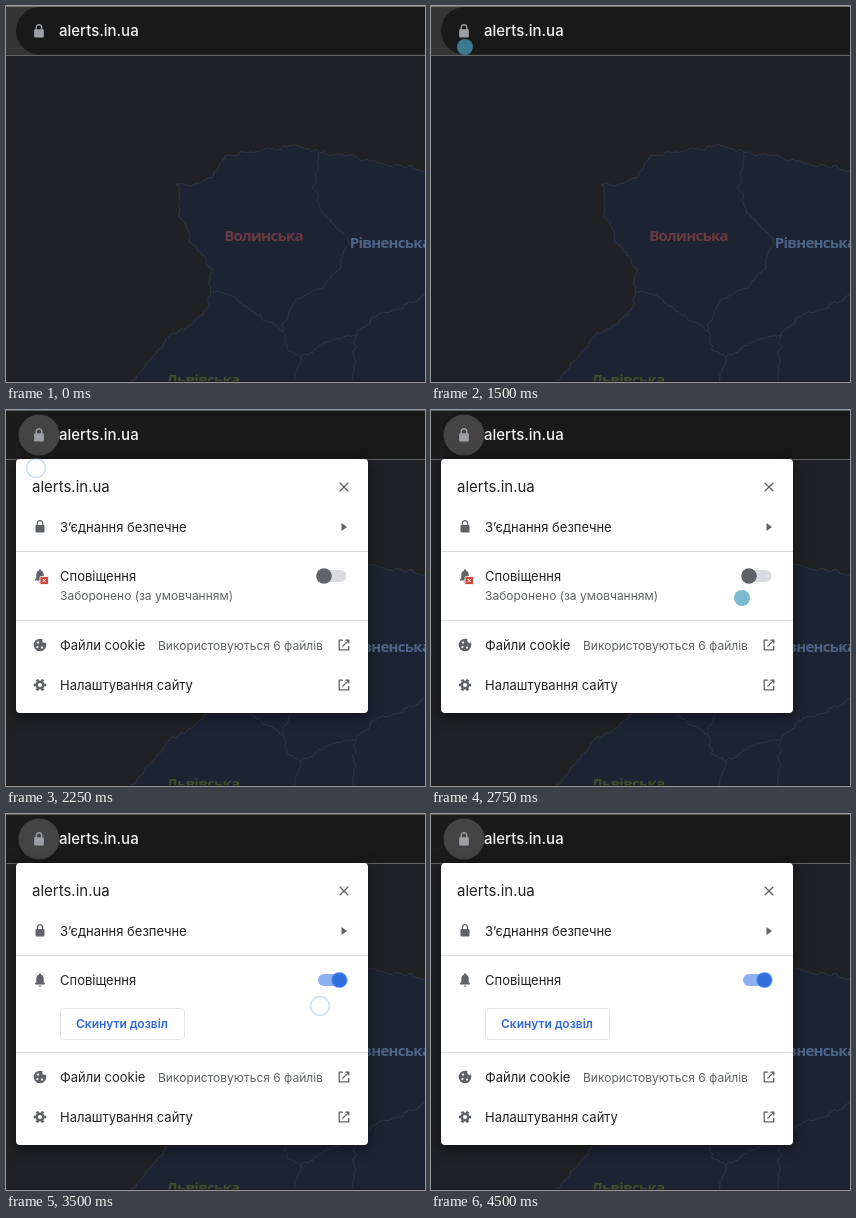
Write an HTML page that moves like this. It is 419 by 376 pixels and loops after 5250 ms.

```html
<!DOCTYPE html>
<html lang="uk">
<head>
<meta charset="utf-8">
<title>Дозвіл на сповіщення</title>
<style>
  html, body { margin: 0; width: 100%; height: 100%; overflow: hidden; background: #202124; }
  svg { display: block; width: 419px; height: 376px; }
  text { font: 400 13px Inter, Roboto, sans-serif; fill: #202124; }
  .host { font-size: 15px; }
  .sub { font-size: 12px; fill: #5f6368; }
  .btn { font-size: 12px; font-weight: 600; fill: #3069d8; }
  .region {
    font: 700 15px "Open Sans", "Noto Sans", sans-serif;
    letter-spacing: -.7px;
    text-anchor: middle;
  }
  .icon { fill: #5f6368; }
  .line { fill: none; stroke: #5f6368; stroke-width: 1.3; }
  .rule { fill: #dadce0; }
  #land { fill: #1c2433; }
  #borders { fill: none; stroke: #2d3746; stroke-width: 1; }
  #panel { filter: drop-shadow(0 3px 7px rgba(0, 0, 0, .5)); }
  #dot { fill: rgba(72, 158, 190, .72); }
  #ring { fill: none; stroke: rgba(88, 175, 205, .32); stroke-width: 1.7; }
</style>
</head>
<body>
<svg viewBox="0 0 419 376">
  <defs>
    <g id="lock">
      <rect x="-4.5" y="-2" width="9" height="7.6" rx="1"/>
      <path d="M-2.6-1.5v-2.2a2.6 2.6 0 0 1 5.2 0v2.2" fill="none" stroke-width="1.3"/>
    </g>
    <path id="open" class="line" d="M-1-4.8H-4.8V4.8H4.8V1M1.4-4.8H4.8V-1.4M4.8-4.8L-1.6 1.6"/>
  </defs>

  <rect width="419" height="376" fill="#202124"/>
  <path id="land"/>
  <path id="borders"/>
  <text class="region" x="257.5" y="235" style="fill:#6c3a43">Волинська</text>
  <text class="region" x="384" y="242" style="fill:#4c6489">Рівненська</text>
  <text class="region" x="197" y="379" style="fill:#424d2b">Львівська</text>
  <rect y="375" width="419" height="1" fill="#17110f" opacity=".5"/>

  <rect id="bar" width="419" height="49" fill="#353536"/>
  <rect id="pill" x="10" y="1" width="450" height="47.5" rx="23.7" fill="#191919"/>
  <rect id="edge" width="419" height="1" fill="#747577"/>
  <rect y="49" width="419" height="1" fill="#626366"/>
  <circle id="halo" cx="33" cy="25" r="20.5" fill="#444445"/>
  <use href="#lock" transform="translate(33 25.5) scale(1.08)" fill="#9c9fa3" stroke="#9c9fa3"
       stroke-width="0"/>
  <text class="host" x="53" y="30" style="fill:#f1f2f4;font-weight:500">alerts.in.ua</text>

  <g id="popup">
    <rect id="panel" x="10" y="49" width="352" height="254" rx="4" fill="#fff"/>
    <text class="host" x="26" y="82">alerts.in.ua</text>
    <path class="line" d="M333.7 72.7l8.6 8.6m0-8.6l-8.6 8.6"/>

    <use href="#lock" x="34" y="117" class="icon" stroke="#5f6368" stroke-width="0"/>
    <text x="54" y="122">З’єднання безпечне</text>
    <path class="icon" d="M335.5 113l5.5 4-5.5 4z"/>
    <rect class="rule" x="10" y="141" width="352" height="1"/>

    <path class="icon" d="M29 170.5v-1l1.3-1.4v-3.4q0-3.2 2.7-3.9v-.5a1 1 0 0 1 2 0v.5q2.7.7 2.7 3.9v3.4l1.3 1.4v1zM32.7 171.4h2.6a1.3 1.3 0 0 1-2.6 0z"/>
    <text x="54" y="171">Сповіщення</text>

    <g id="denied">
      <rect x="34" y="166.5" width="8.5" height="8" rx="1" fill="#d0443a" stroke="#fff" stroke-width=".8"/>
      <path d="M36.6 168.9l3.2 3.2m0-3.2l-3.2 3.2" stroke="#fff"/>
      <text class="sub" x="54" y="190">Заборонено (за умовчанням)</text>
    </g>
    <rect id="track" x="312" y="160" width="28.5" height="12" rx="6"/>
    <circle id="knob" cx="318" cy="166" r="7.8"/>

    <g id="reset">
      <rect x="54.5" y="194.5" width="124" height="31" rx="3.5" fill="#fff" stroke="#e3e5e8"/>
      <text class="btn" x="70" y="214">Скинути дозвіл</text>
    </g>

    <g id="lower">
      <rect class="rule" x="10" y="210" width="352" height="1"/>
      <circle class="icon" cx="34" cy="235" r="6.3"/>
      <g fill="#fff">
        <circle cx="38.6" cy="230.6" r="2.3"/>
        <circle cx="32" cy="232.6" r="1.1"/>
        <circle cx="31.4" cy="237" r="1.1"/>
        <circle cx="36" cy="237.6" r="1.1"/>
      </g>
      <text x="54" y="240">Файли cookie</text>
      <text class="sub" x="152" y="239.5">Використовуються 6 файлів</text>
      <use href="#open" x="338" y="235"/>

      <g fill="none" stroke="#5f6368" stroke-width="2.5">
        <circle cx="34" cy="275" r="3.3"/>
        <circle cx="34" cy="275" r="5" pathLength="12" stroke-dasharray="1" stroke-dashoffset=".5"/>
      </g>
      <text x="54" y="280">Налаштування сайту</text>
      <use href="#open" x="338" y="275"/>
    </g>
  </g>

  <circle id="dot" r="8"/>
  <circle id="ring" r="9.4"/>
</svg>
<script>
const LOOP = 5250, TICK = 250;
const PRESS = 2000, OPEN = 2250, ALLOW = 3500;
const $ = id => document.getElementById(id);

// Ragged borders: a few key points joined by seeded midpoint displacement
let seed = 11;
const rand = () => (seed = seed * 16807 % 2147483647) / 2147483647 - .5;

function rough(a, b) {
  const len = Math.hypot(b[0] - a[0], b[1] - a[1]);
  if (len < 3) return [b];
  const sway = Math.min(len * .5, 4);
  const mid = [0, 1].map(i => (a[i] + b[i]) / 2 + rand() * sway);
  return [...rough(a, mid), ...rough(mid, b)];
}

function border(spec) {
  const pts = spec.split(' ').map(p => p.split(',').map(Number));
  return pts.slice(1).reduce((out, p, i) => out.concat(rough(pts[i], p)), [pts[0]]);
}

const path = pts => 'M' + pts.map(p => p.map(v => v.toFixed(1)).join(' ')).join('L');

const lines = [
  '204,286 207,264 186,238 173,206 170,178 184,180 205,172 219,149 251,145 283,139 313,146 345,149 372,157 420,164',
  '204,286 197,309 165,328 124,377',
  '313,146 306,182 315,204 342,235 335,262 316,283 290,293 277,325',
  '204,286 228,291 250,308 277,325',
  '277,325 281,344 295,352 290,377',
  '295,352 327,333 350,330 347,377',
  '350,330 372,308 396,303 420,288'
].map(border);
const [coast, west] = lines;

$('land').setAttribute('d', path([...west.slice().reverse(), ...coast, [420, 377]]) + 'Z');
$('borders').setAttribute('d', lines.map(path).join(''));

// Each step [time, style] holds until the next one
const runs = [];
function hold(id, steps) {
  const frames = steps.map(([t, style]) => ({ ...style, offset: t / LOOP, easing: 'steps(1, end)' }));
  frames.push({ ...steps[steps.length - 1][1], offset: 1 });
  runs.push($(id).animate(frames, { duration: LOOP, iterations: Infinity }));
}

const swap = (id, time, before, after) => hold(id, [[0, before], [time, after]]);
const fill = color => ({ fill: color });
const move = (x, y) => ({ transform: `translate(${x}px, ${y}px)` });
const off = { opacity: 0 }, on = { opacity: 1 };

hold('bar', [[0, fill('#353536')], [PRESS, fill('#2c2c2d')], [OPEN, fill('#1c1c1c')]]);
swap('edge', PRESS, fill('#747577'), fill('#5c5d5f'));
swap('halo', PRESS, off, on);
swap('popup', OPEN, off, on);
swap('panel', ALLOW, { height: '254px' }, { height: '282px' });
swap('denied', ALLOW, on, off);
swap('reset', ALLOW, off, on);
swap('lower', ALLOW, move(0, 0), move(0, 28));
swap('track', ALLOW, fill('#dadce0'), fill('#8db2f1'));
swap('knob', ALLOW, { ...fill('#5f6368'), ...move(0, 0) }, { ...fill('#3270de'), ...move(15.5, 0) });

// Pointer visits: start time, then one place per tick, hidden afterwards
function visit(id, ...trips) {
  const hidden = { ...move(0, 0), ...off };
  const steps = trips.flatMap(([start, ...spots]) => [
    ...spots.map((spot, i) => [start + i * TICK, { ...move(...spot), ...on }]),
    [start + spots.length * TICK, hidden]
  ]);
  hold(id, [[0, hidden], ...steps]);
}

const toggle = [318, 172], lock = [30, 58], below = [314, 192];
visit('dot', [1000, [408, 155], [56, 60], [34, 41], [35, 38]], [2750, [311, 188], toggle], [4000, toggle, toggle]);
visit('ring', [PRESS, lock, lock], [3250, below, below]);

const start = document.timeline.currentTime || 0;
runs.forEach(run => run.startTime = start);
</script>
</body>
</html>
```
